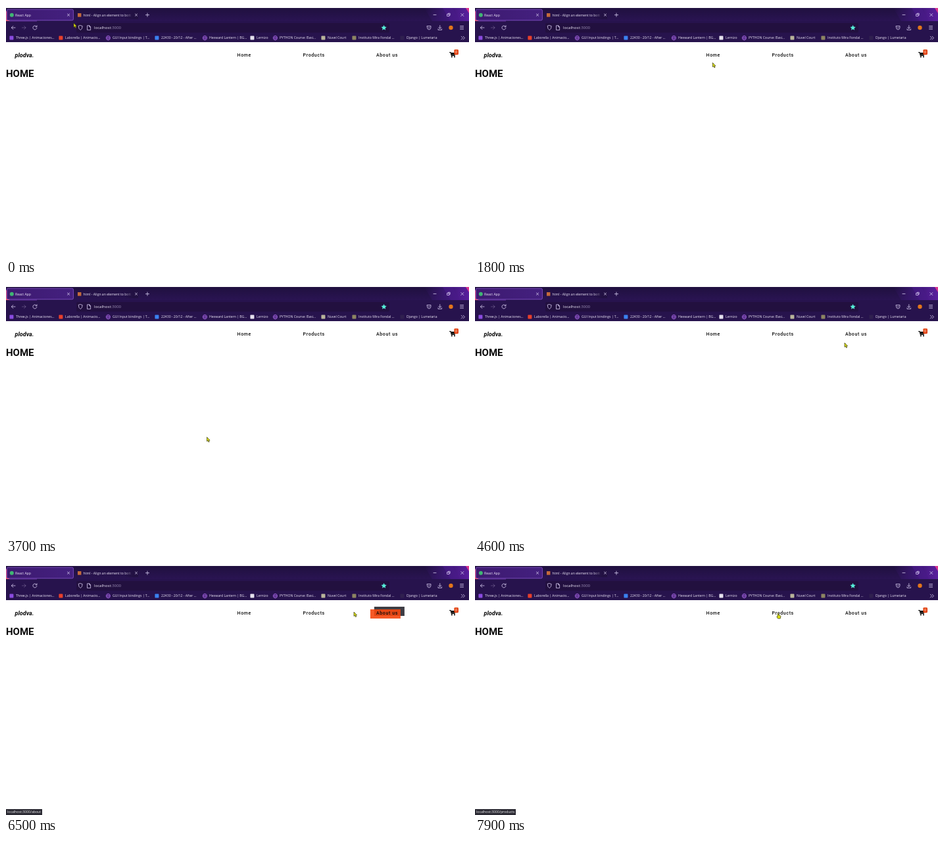
Write an HTML page that moves like this. It is 704x382 px and loops after 8 s.

```html
<!DOCTYPE html>
<html lang="en">
<head>
<meta charset="utf-8">
<title>React App</title>
<style>
  html, body { margin: 0; width: 100%; height: 100%; overflow: hidden; background: #fff; }
  #stage { position: relative; width: 704px; height: 382px; overflow: hidden; }
  svg { display: block; }
  text { white-space: pre; }
  .ui { font: 5.1px "Open Sans", "Noto Sans", sans-serif; fill: #eee8f8; }
  .url { font-size: 6.1px; }
  .line { fill: none; stroke: #d9cdf0; stroke-width: .8; stroke-linecap: round; stroke-linejoin: round; }
  .page { font-family: Roboto, sans-serif; fill: #0b0b0b; }
  .nav { font-size: 7px; font-weight: 500; letter-spacing: .62px; }
  #status {
    position: absolute; left: 0; bottom: 0; box-sizing: border-box; height: 9px; padding: 0 2px;
    font: 5.2px/9.4px "Open Sans", "Noto Sans", sans-serif; white-space: nowrap;
    color: #f2f2f4; background: #2b2a33; opacity: 0;
  }
</style>
</head>
<body>
<div id="stage">
<svg width="704" height="382" viewBox="0 0 704 382">
  <defs>
    <linearGradient id="bar" x2="0" y2="1">
      <stop offset="0" stop-color="#20103f"/><stop offset="1" stop-color="#2a1452"/>
    </linearGradient>
    <linearGradient id="tab">
      <stop offset="0" stop-color="#3d1a70"/><stop offset="1" stop-color="#44207f"/>
    </linearGradient>
    <linearGradient id="fade">
      <stop offset="0" stop-color="#221142" stop-opacity="0"/><stop offset="1" stop-color="#221142"/>
    </linearGradient>
    <linearGradient id="glow">
      <stop offset="0" stop-color="#3b1773" stop-opacity="0"/><stop offset=".5" stop-color="#3b1773"/>
      <stop offset="1" stop-color="#5a1f9e"/>
    </linearGradient>
  </defs>

  <!-- browser window -->
  <rect y="3" width="704" height="52" fill="#27134d"/>
  <rect y="3" width="704" height="20" fill="url(#bar)"/>
  <path d="M636 3H704V23H648Z" fill="url(#glow)"/>
  <path d="M664 3H679L690 23H676Z" fill="#4a1a88" opacity=".6"/>
  <path d="M699 3H704V11Z" fill="#d9368f"/>
  <path d="M0 8H2V21H5V23H0Z" fill="#f0566a"/>
  <path d="M5 23H47" stroke="#7a3ab8" stroke-width=".8"/>
  <rect x="1.2" y="5.2" width="101.2" height="16.6" rx="1.8" fill="url(#tab)" stroke="#8a56cf" stroke-width=".8"/>
  <circle cx="8.8" cy="13.8" r="3" fill="#3fb573"/>
  <rect x="109" y="11" width="5.4" height="5.6" fill="#c46a3a"/>
  <g class="ui">
    <text x="14" y="15.8">React App</text>
    <text x="117.6" y="15.8">html - Align an element to bott</text>
  </g>
  <rect x="180" y="8" width="14" height="12" fill="url(#fade)"/>
  <rect x="194" y="8" width="7" height="12" fill="#221142"/>
  <g class="line">
    <path d="M93.4 12l3.2 3.2m0-3.2l-3.2 3.2M196.4 12l3.2 3.2m0-3.2l-3.2 3.2M212.4 13.6h5.2m-2.6-2.6v5.2"/>
    <path d="M650 13.4h4M671 12.4h3v3h-3zM672.2 12.2v-1h3v3h-1M691.8 11.5l4 4m0-4l-4 4"/>
  </g>

  <rect x="107" y="26" width="476" height="14.4" rx="2" fill="#22103f"/>
  <g class="line">
    <path d="M14 33H8.4m2.4-2.5L8.3 33l2.5 2.5"/>
    <path d="M24.4 33H30m-2.4-2.5l2.5 2.5l-2.5 2.5" opacity=".35"/>
    <path d="M46.5 31.4a3 3 0 1 0 .4 2.2M47 29.8v2h-2"/>
    <path d="M113.2 29.6l3 1q0 4.600-3 6q-3-1.400-3-6z"/>
    <path d="M123.900 29.800h3l1.700 1.800v5h-4.700zM126.700 30v1.900h1.800"/>
    <path d="M640.400 30.500h5.600v2.400q-.4 3-2.800 3.100q-2.400-.1-2.800-3.100zM641.900 32.400l1.300 1.300l1.300-1.300"/>
    <path d="M659.800 29.600v4.800m-2-2l2 2l2-2M657 34.800v1.600h5.600v-1.600"/>
    <path d="M690.600 30.600h5M690.600 32.900h5M690.600 35.200h5"/>
    <path d="M692.300 46.200l2.400 2.400l-2.400 2.400M695.200 46.200l2.400 2.400l-2.400 2.400"/>
  </g>
  <path d="M574.600 28.900l1.200 2.700l2.900.3l-2.200 2l.7 2.900l-2.600-1.500l-2.600 1.500l.7-2.900l-2.200-2l2.900-.3z" fill="#55efd8"/>
  <circle cx="676.500" cy="33" r="3.200" fill="#e2761b"/>
  <text class="ui url" x="134" y="35.200">localhost<tspan fill="#9a8cb4">:3000</tspan></text>
  <g id="marks" class="ui"></g>

  <!-- web page -->
  <g class="page">
    <text x="13.600" y="77.800" font-size="9" font-weight="700" font-style="italic">plodva.</text>
    <text x="0" y="108" font-size="15" font-weight="700">HOME</text>
    <g id="menu"></g>
    <path d="M674.200 70.600h1.900l1.200 4.900h5.400" fill="none" stroke="#0b0b0b" stroke-width="1.100"/>
    <path d="M676.300 71h7.700l-1 3.800h-5.800z"/>
    <circle cx="677.900" cy="77.300" r="1.100"/><circle cx="682" cy="77.300" r="1.100"/>
    <rect x="681.400" y="66.200" width="6.600" height="8" rx="1.400" fill="#e2410f"/>
    <text x="684.700" y="72.300" font-size="5.600" text-anchor="middle" style="fill:#ffe9e0">0</text>
  </g>

  <g id="cursor" fill="#dfe312" stroke="#35350c" stroke-width=".7" stroke-linejoin="round">
    <path id="arrow" d="M0 0V6.400L1.500 5.200L2.600 7.600L3.700 7.100L2.700 4.800H4.500Z"/>
    <path id="hand" d="M-.8 .6Q0-.4 .8 .6V3L3.300 3.700Q4 4 3.800 5L3.200 8H-.5L-2.200 5.300Q-2 4.200-.8 4.900Z"/>
  </g>
</svg>
<div id="status"></div>
</div>

<script>
const LOOP = 8000, STEP = 100;
const $ = id => document.getElementById(id);
const clamp = v => Math.max(0, Math.min(1, v));

function add(parent, name, attrs, text) {
  const el = document.createElementNS("http://www.w3.org/2000/svg", name);
  for (const k in attrs) el.setAttribute(k, attrs[k]);
  if (text) el.textContent = text;
  return parent.appendChild(el);
}

// Bookmarks: x of the label, label, icon colour ("globe" for the generic icon)
const bookmarks = [
  [15, "Three.js | Animaciones...", "#8a4be0"],
  [90, "Laborella | Animacio...", "#e8402c"],
  [162, "GUI Input bindings | T...", "globe"],
  [236, "22430 - 20/12 - After ...", "#3b82f0"],
  [309, "Hexward Lantern | BG...", "globe"],
  [381, "Lernizo", "#e6e2ee"],
  [416, "PYTHON Course: Basi...", "globe"],
  [489, "Nuvel Court", "#b9b59a"],
  [536, "Instituto Mira Fondal ...", "#8d8562"],
  [609, "Django | Lumetaria", "#30204f"]
];
for (const [x, label, icon] of bookmarks) {
  const cx = x - 6.6, g = $("marks");
  if (icon === "globe") {
    const line = { fill: "none", stroke: "#b06af0", "stroke-width": .7 };
    add(g, "circle", { cx, cy: 48.6, r: 3.2, ...line });
    add(g, "ellipse", { cx, cy: 48.6, rx: 1.4, ry: 3.2, ...line });
    add(g, "path", { d: `M${cx - 3.2} 48.600h6.400`, ...line });
  } else {
    add(g, "rect", { x: cx - 3, y: 45.6, width: 6, height: 6, rx: .8, fill: icon });
  }
  add(g, "text", { x, y: 50.4 }, label);
}

function menuItem(x, width, label, path) {
  const g = $("menu");
  const box = fill => add(g, "rect", { x: x + width / 2 - (width + 13) / 2 + .4, y: 67, width: width + 13, height: 14, fill });
  const shadow = box("#3d3d44"), front = box("rgba(245,72,16,.9)");
  add(g, "text", { x, y: 77, class: "nav" }, label);
  return { shadow, front, url: "localhost:3000" + path };
}
const home = menuItem(351.6, 22, "Home", "");
const products = menuItem(451.6, 33, "Products", "/products");
const about = menuItem(563, 33, "About us", "/about");
const items = [home, products, about];

// Link, pointer enters, pointer leaves
const hovers = [
  [about, 5600, 6500],
  [products, 6600, 6900],
  [home, 7300, 7500],
  [products, 7900, LOOP]
];

// Pointer path: time, x, y
const path = [
  [0, 103, 26], [400, 103, 26], [700, 107, 46], [1000, 123, 68], [1300, 127, 82],
  [1500, 178, 76], [1600, 224, 79], [1900, 430, 90], [2100, 570, 130], [2200, 586, 181],
  [2300, 598, 206], [2600, 631, 208], [2800, 650, 208], [3100, 650, 208], [3200, 427, 267],
  [3400, 427, 267], [3600, 355, 250], [3800, 256, 213], [4000, 345, 147], [4100, 375, 134],
  [4300, 470, 98], [4600, 562, 88], [4800, 592, 92], [5400, 592, 92], [5600, 587, 77],
  [6000, 578, 74], [6200, 578, 74], [6300, 566, 74], [6500, 529, 73], [6700, 466, 74],
  [7000, 398, 75], [7200, 376, 75], [7400, 364, 76], [7600, 385, 76], [7900, 461, 75]
];

function pointerAt(t) {
  const i = path.findIndex(p => p[0] > t);
  if (i < 0) return path[path.length - 1].slice(1);
  const [t0, x0, y0] = path[i - 1], [t1, x1, y1] = path[i];
  const k = (t - t0) / (t1 - t0);
  return [x0 + (x1 - x0) * k, y0 + (y1 - y0) * k];
}

function draw(t) {
  const [x, y] = pointerAt(t);
  let onLink = false, url = "", opacity = 0;
  for (const item of items) item.amount = 0;
  for (const [item, from, to] of hovers) {
    if (t < from) continue;
    const inside = t < to;
    onLink = onLink || inside;
    const amount = inside ? clamp((t - from) / 200) : 1 - clamp((t - to) / 200);
    item.amount = Math.max(item.amount, amount);
    url = item.url;
    opacity = 1 - clamp((t - to - 150) / 200);
  }
  for (const { shadow, front, amount } of items) {
    shadow.setAttribute("transform", `translate(${3 * amount} ${-2 * amount})`);
    front.setAttribute("transform", `translate(${-3 * amount} ${2 * amount})`);
    shadow.setAttribute("opacity", amount);
    front.setAttribute("opacity", amount);
  }
  $("status").textContent = url;
  $("status").style.opacity = opacity;
  $("cursor").setAttribute("transform", `translate(${x} ${y})`);
  $("arrow").style.display = onLink ? "none" : "";
  $("hand").style.display = onLink ? "" : "none";
}

const start = performance.now();
function tick() {
  const t = (performance.now() - start) % LOOP;
  draw(Math.floor(t / STEP) * STEP);
  requestAnimationFrame(tick);
}
tick();
</script>
</body>
</html>
```
